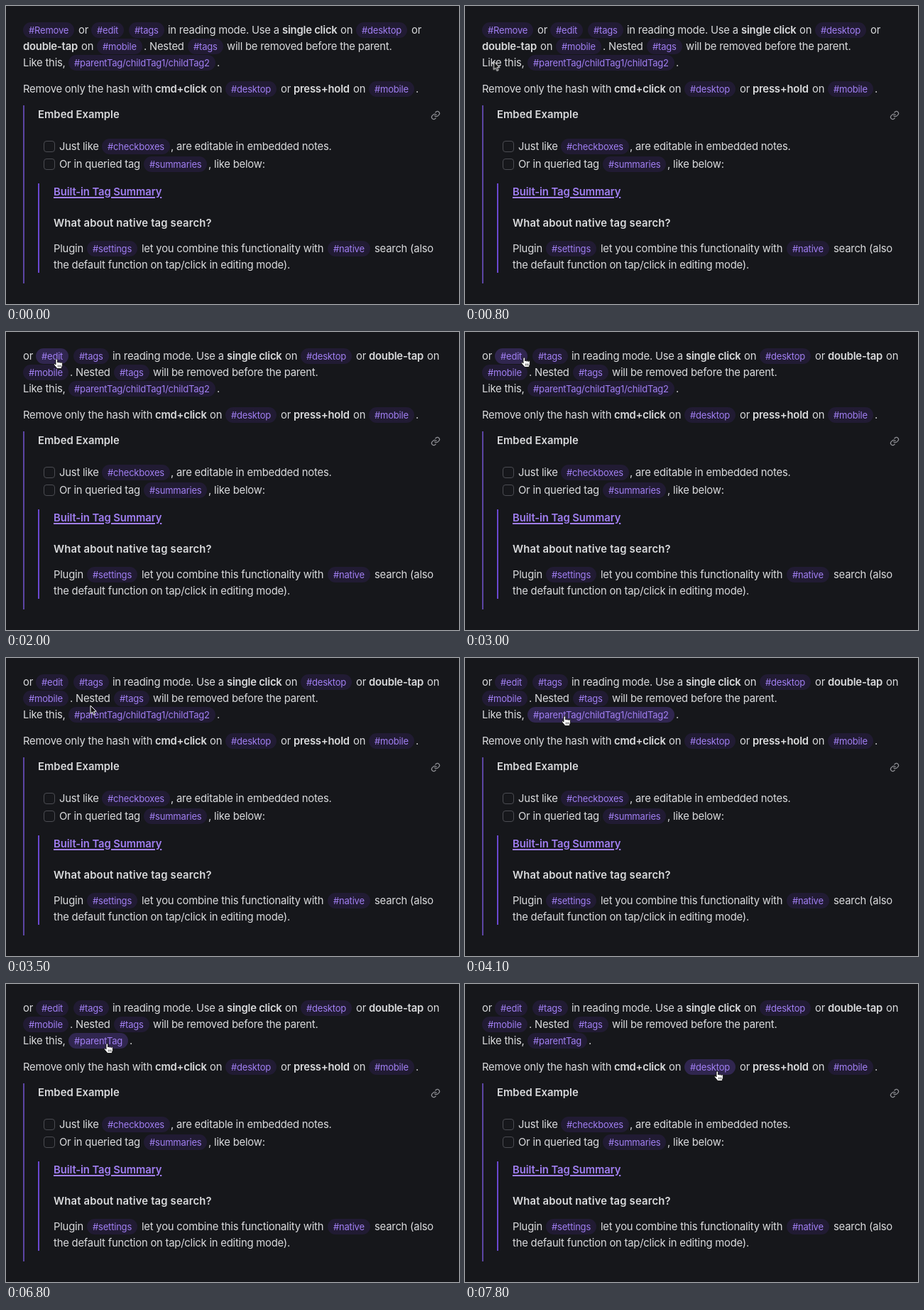
Recreate the animation shown at these times as an HTML page. Size 638 by 420 pixels, loop 8000 ms.

```html
<!DOCTYPE html>
<html lang="en">
<head>
<meta charset="utf-8">
<title>Tag removal demo</title>
<style>
html, body { margin: 0; width: 100%; height: 100%; overflow: hidden; background: #16171b; }
.stage {
  position: relative; width: 638px; height: 420px; overflow: hidden;
  background: #16171b; color: #dadbdd;
  font: 14.8px/22px Inter, Roboto, sans-serif; letter-spacing: -.21px;
}
.stage * { position: absolute; left: 0; top: 0; white-space: nowrap; }
.row { height: 22px; margin-top: -11px; }
b { font-weight: 600; }
.head { letter-spacing: .04px; }
.sub { letter-spacing: .18px; }
.link {
  color: #a17ff2; letter-spacing: -.09px;
  text-decoration: underline; text-decoration-thickness: 1.5px; text-underline-offset: 2px;
}
i {
  --pill: #211b33;
  padding: 0 8px; border-radius: 11px; background: var(--pill); color: #a17ff2;
  font: 13px/22px Inter, Roboto, sans-serif; letter-spacing: -.2px;
}
.bar { width: 2px; }
.box { width: 14px; height: 14px; border: 1px solid #4b4c52; border-radius: 4px; }
svg { overflow: visible; }

.loop { animation: 8s step-end infinite; }
.before { animation-name: before; }
.after { animation-name: after; }
.deep { animation-name: deep; }
.mid { animation-name: mid; }
.flat { animation-name: flat; }
.hot-remove { animation-name: hot-remove; }
.hot-edit { animation-name: hot-edit; }
.hot-parent { animation-name: hot-parent; }
.hot-desktop { animation-name: hot-desktop; }
.hand { animation-name: hand; }
.arrow { animation-name: arrow; }
.cursor { animation: move 8s infinite; }

@keyframes before { 0% { visibility: visible } 25%, 100% { visibility: hidden } }
@keyframes after { 0% { visibility: hidden } 25%, 100% { visibility: visible } }
@keyframes deep { 0% { visibility: visible } 56.25%, 100% { visibility: hidden } }
@keyframes mid { 0%, 66.25%, 100% { visibility: hidden } 56.25% { visibility: visible } }
@keyframes flat { 0% { visibility: hidden } 66.25%, 100% { visibility: visible } }

@keyframes hot-remove { 0%, 25%, 100% { background: var(--pill) } 15% { background: #30264f } }
@keyframes hot-edit { 0%, 40%, 100% { background: var(--pill) } 25% { background: #30264f } }
@keyframes hot-parent { 0%, 87.5%, 100% { background: var(--pill) } 45% { background: #30264f } }
@keyframes hot-desktop { 0% { background: var(--pill) } 92.5%, 100% { background: #30264f } }

@keyframes hand {
  0%, 40%, 87.5% { visibility: hidden }
  15%, 45%, 92.5%, 100% { visibility: visible }
}
@keyframes arrow {
  0%, 40%, 87.5% { visibility: visible }
  15%, 45%, 92.5%, 100% { visibility: hidden }
}
@keyframes move {
  0% { transform: translate(-30px, 125px); animation-timing-function: step-end }
  3.75% { transform: translate(2px, 125px); animation-timing-function: steps(4) }
  8.75% { transform: translate(34px, 87px); animation-timing-function: steps(4) }
  13.75% { transform: translate(56px, 48px); animation-timing-function: steps(3) }
  17.5% { transform: translate(67px, 37px); animation-timing-function: step-end }
  37.5% { transform: translate(79px, 35px); animation-timing-function: steps(2) }
  40% { transform: translate(88px, 45px); animation-timing-function: steps(4) }
  45% { transform: translate(128px, 73px); animation-timing-function: steps(2) }
  47.5% { transform: translate(135px, 79px); animation-timing-function: step-end }
  48.75% { transform: translate(136px, 81px); animation-timing-function: step-end }
  85% { transform: translate(138px, 83px); animation-timing-function: steps(2) }
  87.5% { transform: translate(170px, 88px); animation-timing-function: steps(4) }
  92.5% { transform: translate(318px, 113px); animation-timing-function: steps(2) }
  95% { transform: translate(348px, 120px); animation-timing-function: steps(2) }
  97.5%, 100% { transform: translate(351px, 122px) }
}
</style>
</head>
<body>
<div class="stage">

  <div class="loop before">
    <div class="row" style="top:34px">
      <i class="loop hot-remove" style="left:24px">#Remove</i>
      <span style="left:102px">or</span>
      <i style="left:120px">#edit</i>
      <i style="left:173px">#tags</i>
      <span style="left:228px">in reading mode. Use a</span>
      <b style="left:389px">single click</b>
      <span style="left:471px">on</span>
      <i style="left:493px">#desktop</i>
      <span style="left:571px">or</span>
    </div>
    <div class="row" style="top:57px">
      <b style="left:24px">double-tap</b>
      <span style="left:106px">on</span>
      <i style="left:128px">#mobile</i>
      <span style="left:194px">. Nested</span>
      <i style="left:256px">#tags</i>
      <span style="left:311px">will be removed before the parent.</span>
    </div>
  </div>

  <div class="loop after">
    <div class="row" style="top:34px">
      <span style="left:24px">or</span>
      <i class="loop hot-edit" style="left:42px">#edit</i>
      <i style="left:95px">#tags</i>
      <span style="left:150px">in reading mode. Use a</span>
      <b style="left:311px">single click</b>
      <span style="left:393px">on</span>
      <i style="left:415px">#desktop</i>
      <span style="left:493px">or</span>
      <b style="left:511px">double-tap</b>
      <span style="left:593px">on</span>
    </div>
    <div class="row" style="top:57px">
      <i style="left:24px">#mobile</i>
      <span style="left:90px">. Nested</span>
      <i style="left:152px">#tags</i>
      <span style="left:207px">will be removed before the parent.</span>
    </div>
  </div>

  <div class="row" style="top:80px">
    <span style="left:24px">Like this,</span>
    <div class="loop deep">
      <i class="loop hot-parent" style="left:88px">#parentTag/childTag1/childTag2</i>
      <span style="left:297px">.</span>
    </div>
    <div class="loop mid">
      <i class="loop hot-parent" style="left:88px">#parentTag/childTag1</i>
      <span style="left:234px">.</span>
    </div>
    <div class="loop flat">
      <i class="loop hot-parent" style="left:88px">#parentTag</i>
      <span style="left:174px">.</span>
    </div>
  </div>

  <div class="row" style="top:117px">
    <span style="left:24px">Remove only the hash with</span>
    <b style="left:210px">cmd+click</b>
    <span style="left:287px">on</span>
    <i class="loop hot-desktop" style="left:309px">#desktop</i>
    <span style="left:387px">or</span>
    <b style="left:405px">press+hold</b>
    <span style="left:489px">on</span>
    <i style="left:511px">#mobile</i>
    <span style="left:577px">.</span>
  </div>

  <div class="bar" style="left:24px;top:140px;height:251px;background:#5c45a3"></div>
  <div class="bar" style="left:45px;top:250px;height:126px;background:#6a48d0"></div>

  <div class="row" style="top:153px"><b class="head" style="left:45px">Embed Example</b></div>
  <svg width="14" height="14" viewBox="0 0 24 24" style="left:598px;top:147px" fill="none" stroke="#909196" stroke-width="2.1" stroke-linecap="round" stroke-linejoin="round">
    <path d="M10 13a5 5 0 0 0 7.5.5l3-3a5 5 0 0 0-7-7l-1.7 1.7"/>
    <path d="M14 11a5 5 0 0 0-7.5-.5l-3 3a5 5 0 0 0 7 7l1.7-1.7"/>
  </svg>

  <div class="box" style="left:53px;top:190px"></div>
  <div class="row" style="top:198px">
    <span style="left:75px">Just like</span>
    <i style="left:135px">#checkboxes</i>
    <span style="left:232px">, are editable in embedded notes.</span>
  </div>
  <div class="box" style="left:53px;top:215px"></div>
  <div class="row" style="top:223px">
    <span style="left:75px">Or in queried tag</span>
    <i style="left:194px">#summaries</i>
    <span style="left:285px">, like below:</span>
  </div>

  <div class="row" style="top:262px"><b class="link" style="left:67px">Built-in Tag Summary</b></div>
  <div class="row" style="top:305.5px"><b class="sub" style="left:67px">What about native tag search?</b></div>
  <div class="row" style="top:342px">
    <span style="left:67px">Plugin</span>
    <i style="left:114px">#settings</i>
    <span style="left:191px">let you combine this functionality with</span>
    <i style="left:453px">#native</i>
    <span style="left:519px">search (also</span>
  </div>
  <div class="row" style="top:365px"><span style="left:67px">the default function on tap/click in editing mode).</span></div>

  <div class="cursor">
    <svg class="loop hand" width="13" height="15" fill="#fff" stroke="#111" stroke-width=".9" stroke-linejoin="round">
      <path d="M3 9V2.2a1.3 1.3 0 0 1 2.6 0V6a1.2 1.2 0 0 1 2.3.3a1.2 1.2 0 0 1 2.3.4a1.1 1.1 0 0 1 2.2.4V10.5L11 14.5H5L1 9.8Q0 8.3 1 7.7Q2 7.3 3 9Z"/>
      <path d="M6.3 9.5v3M8.2 9.5v3M10 9.5v3" stroke-width=".7"/>
    </svg>
    <svg class="loop arrow" width="11" height="15" fill="#111" stroke="#fff" stroke-width="1" stroke-linejoin="round">
      <path d="M1 1V12.5L3.7 10L5.5 14.2L7.5 13.3L5.7 9.3H9.3Z"/>
    </svg>
  </div>
</div>
</body>
</html>
```
